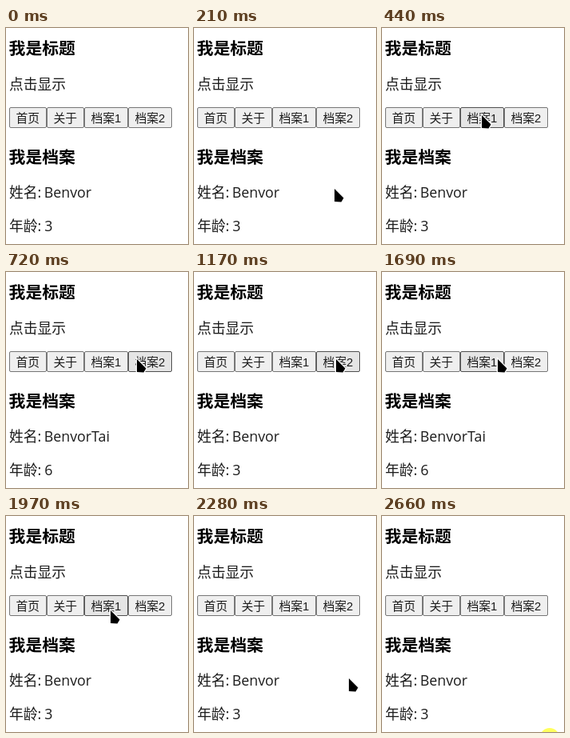
An HTML page with a canvas for the animation above (2740 ms loop, 228 px wide and 270 px high).

```html
<!DOCTYPE html>
<html lang="zh">
<head>
<meta charset="utf-8">
<style>
html, body { margin: 0; width: 100%; height: 100%; overflow: hidden; background: #fff; }
canvas { display: block; }
</style>
</head>
<body>
<canvas id="stage"></canvas>
<script>
const W = 228, H = 270, LOOP = 2740;
const canvas = document.getElementById('stage');
const ctx = canvas.getContext('2d');
const dpr = window.devicePixelRatio || 1;
canvas.width = W * dpr;
canvas.height = H * dpr;
canvas.style.width = W + 'px';
canvas.style.height = H + 'px';

const CJK = '"Noto Sans CJK SC", "Noto Sans CJK", sans-serif';
const BODY = '17.8px "Open Sans", ' + CJK;
const HEAD = 'bold 20.8px ' + CJK;
const LABEL = '14.8px "Liberation Sans", ' + CJK;
const SOFT = '#1c1c1c';

const tabs = ['首页', '关于', '档案1', '档案2'];
const BAR = { x: 4, y: 99, h: 26 };
const tabWidth = text => text.length > 2 ? 55 : 47;

const profiles = [
  { name: 'Benvor', age: 3 },
  { name: 'BenvorTai', age: 6 }
];
const switches = [590, 900, 1300, 1920];

// The pointer rests between moves
const enter = { x: 212, y: 264 };
const moves = [
  { from: 80, to: 400, x: 125, y: 109 },
  { from: 490, to: 580, x: 164, y: 109 },
  { from: 770, to: 850, x: 130, y: 109 },
  { from: 930, to: 1020, x: 178, y: 109 },
  { from: 1580, to: 1760, x: 125, y: 109 },
  { from: 1940, to: 2280, x: 194, y: 203 },
  { from: 2330, to: 2410, x: 211, y: 264 }
];

const clamp = k => Math.min(1, Math.max(0, k));

function pointerAt(t) {
  if (t < 80 || t >= 2460) return null;
  let { x, y } = enter;
  for (const m of moves) {
    const k = clamp((t - m.from) / (m.to - m.from));
    x += (m.x - x) * k;
    y += (m.y - y) * k;
  }
  return { x: Math.round(x), y: Math.round(y) };
}

function profileAt(t) {
  return profiles[switches.filter(s => t >= s).length % 2];
}

function write(text, x, y, font, color = SOFT) {
  ctx.font = font;
  ctx.fillStyle = color;
  ctx.fillText(text, x, y);
}

function drawTab(text, x, w, p) {
  const { y, h } = BAR;
  const hover = p && p.x >= x && p.x < x + w && p.y >= y && p.y < y + h;
  ctx.beginPath();
  ctx.roundRect(x + 0.5, y + 0.5, w - 1, h - 1, 1.5);
  ctx.fillStyle = hover ? '#e5e5e5' : '#efefef';
  ctx.fill();
  ctx.lineWidth = 1;
  ctx.strokeStyle = hover ? '#4f4f4f' : '#767676';
  ctx.stroke();
  write(text, x + 8.5, 118, LABEL);
}

function drawTabs(p) {
  let x = BAR.x;
  for (const text of tabs) {
    const w = tabWidth(text);
    drawTab(text, x, w, p);
    x += w;
  }
}

function drawPointer({ x, y }) {
  const shape = [[0, 0], [0, 16], [8.5, 16.5], [11.5, 11.5]];
  ctx.beginPath();
  shape.forEach(([dx, dy]) => ctx.lineTo(x + dx, y + dy));
  ctx.closePath();
  ctx.lineWidth = 2.5;
  ctx.strokeStyle = '#fff';
  ctx.stroke();
  ctx.fillStyle = '#000';
  ctx.fill();
}

function drawClick() {
  ctx.beginPath();
  ctx.arc(210, 277.5, 12.5, 0, Math.PI * 2);
  ctx.fillStyle = '#ffff5c';
  ctx.fill();
}

function draw(t) {
  const p = pointerAt(t), who = profileAt(t);
  ctx.setTransform(dpr, 0, 0, dpr, 0, 0);
  ctx.fillStyle = '#fff';
  ctx.fillRect(0, 0, W, H);

  write('我是标题', 3.6, 33, HEAD, '#000');
  write('点击显示', 4, 76.5, BODY);
  drawTabs(p);
  write('我是档案', 3.6, 169, HEAD, '#000');
  write('姓名:', 4, 212, BODY);
  write(who.name, 47.8, 212, BODY);
  write('年龄:', 4, 254, BODY);
  write(who.age, 48.2, 254, BODY);

  if (t >= 2660) drawClick();
  if (p) drawPointer(p);
}

const start = performance.now();
function tick() {
  draw((performance.now() - start) % LOOP);
  requestAnimationFrame(tick);
}
tick();
</script>
</body>
</html>
```
